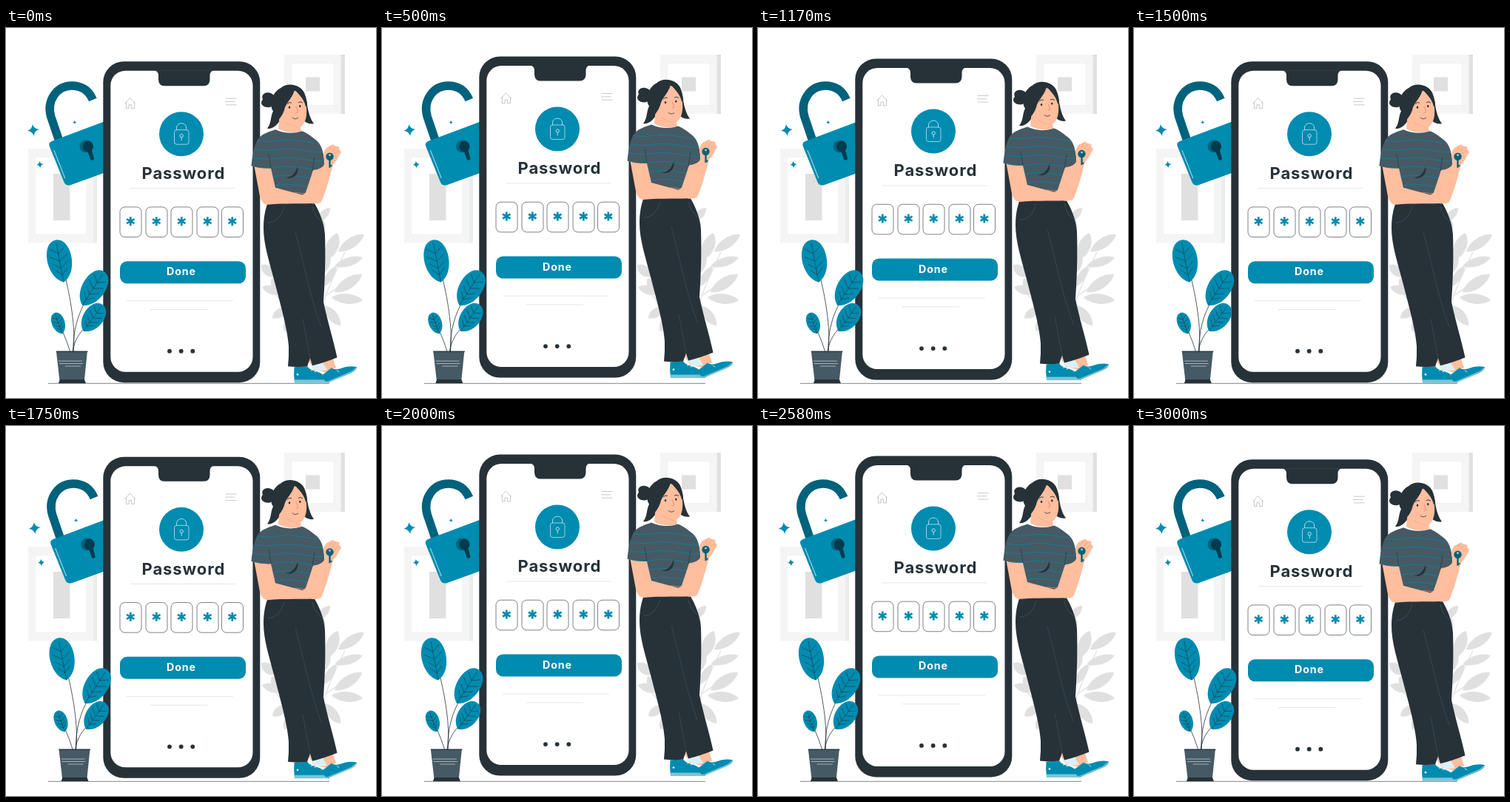
Animation, 500 px wide and 500 px high, one loop 3.04 s. Source, as an HTML page with a canvas:

```html
<!DOCTYPE html>
<html lang="en">
<head>
<meta charset="utf-8">
<title>Password</title>
<style>
html, body { margin: 0; width: 100%; height: 100%; overflow: hidden; background: #fff; }
canvas { display: block; width: 500px; height: 500px; }
</style>
</head>
<body>
<canvas id="stage"></canvas>
<script>
const canvas = document.getElementById('stage');
const ctx = canvas.getContext('2d');
const dpr = window.devicePixelRatio || 1;
canvas.width = canvas.height = 500 * dpr;

const INK = '#263238', SLATE = '#455a64', TEAL = '#008bb0', DEEP = '#00627c';
const SKIN = '#ffbe9d', PALE = '#e0e0e0', WALL = '#f5f5f5';
const LOOP = 3040, FRAMES = 73, STEP = 1000 / 24, LEAD = 30;

const fill = (d, color) => { ctx.fillStyle = color; ctx.fill(new Path2D(d)); };
const line = (d, color, w = 0.5) => {
  ctx.strokeStyle = color;
  ctx.lineWidth = w;
  ctx.stroke(new Path2D(d));
};
const rect = (x, y, w, h, color) => { ctx.fillStyle = color; ctx.fillRect(x, y, w, h); };
const roundPath = (x, y, w, h, r) => { ctx.beginPath(); ctx.roundRect(x, y, w, h, r); };
const round = (x, y, w, h, r, color) => {
  roundPath(x, y, w, h, r);
  ctx.fillStyle = color;
  ctx.fill();
};
const oval = (x, y, rx, ry, color) => {
  ctx.beginPath();
  ctx.ellipse(x, y, rx, ry, 0, 0, Math.PI * 2);
  ctx.fillStyle = color;
  ctx.fill();
};
const text = (s, x, y, size, color, gap) => {
  ctx.font = `700 ${size}px Inter, "Open Sans", sans-serif`;
  ctx.letterSpacing = gap + 'px';
  ctx.textAlign = 'center';
  ctx.fillStyle = color;
  ctx.fillText(s, x, y);
};
const shifted = (x, y, draw) => {
  ctx.save();
  ctx.translate(x, y);
  draw();
  ctx.restore();
};

// Motion
const lift = T => {
  const p = T / 1500 % 1;
  return -10 * (p < 0.5 ? 2 * p : 2 - 2 * p);
};
const SHAKE = [0, -1, 2, -4, 4, -4, 4, -4, 2, -1, 0];
const shake = (T, span) => {
  const p = T / span % 1 * 10, i = Math.floor(p);
  return SHAKE[i] + (SHAKE[i + 1] - SHAKE[i]) * (p - i);
};

// Background
function picture(x, y, w, h, depth, side, art) {
  rect(x, y, w, h, WALL);
  rect(x + w, y, depth, h, side);
  const m = 9.5;
  rect(x + m, y + m + 2, w - 2 * m, h - 2 * m - 4, '#fff');
  line(`M${x} ${y}l${m} ${m + 2}M${x + w} ${y}l${-m} ${m + 2}M${x} ${y + h}l${m} ${-m - 2}M${x + w} ${y + h}l${-m} ${-m - 2}`, '#e9e9e9');
  ctx.strokeStyle = '#ebebeb';
  ctx.strokeRect(x + m, y + m + 2, w - 2 * m, h - 2 * m - 4);
  rect(...art, PALE);
}

function blade(x, y, tx, ty, w) {
  const dx = tx - x, dy = ty - y, n = Math.hypot(dx, dy);
  const px = -dy / n * w, py = dx / n * w;
  const at = (k, s) => `${x + dx * k + s * px} ${y + dy * k + s * py}`;
  fill(`M${x} ${y}C${at(0.25, 1)} ${at(0.75, 1)} ${tx} ${ty}C${at(0.75, -1)} ${at(0.25, -1)} ${x} ${y}Z`, PALE);
}

function backdrop() {
  line('M57 480.3H437', INK, 0.6);
  picture(30, 163, 88, 127.5, 5, '#ededed', [64, 197, 22.5, 63]);
  picture(376, 36, 76.5, 80, 5.5, PALE, [405, 66.5, 19, 19]);
  line('M424 398C428 360 446 330 458 303M431 362C440 357 448 351 453 346M425 300C428 280 428 265 427 255M364 360C374 370 384 384 390 398', PALE, 1.2);
  [[420, 262, 438, 243, 7], [424, 280, 428, 258, 7], [434, 313, 448, 277, 11],
   [449, 302, 484, 279, 9], [444, 322, 482, 310, 8], [428, 332, 436, 304, 8],
   [444, 357, 481, 333, 10], [440, 364, 482, 368, 9], [430, 375, 452, 402, 9],
   [428, 350, 446, 322, 7], [364, 336, 345, 320, 9], [374, 358, 346, 350, 8],
   [369, 358, 359, 338, 7], [380, 378, 360, 392, 8], [386, 390, 376, 410, 7]
  ].forEach(b => blade(...b));
}

// Padlock
function star(x, y, r) {
  ctx.save();
  ctx.translate(x, y);
  ctx.rotate(-0.12);
  const q = r * 0.16;
  fill(`M0 ${-r}Q${q} ${-q} ${r} 0Q${q} ${q} 0 ${r}Q${-q} ${q} ${-r} 0Q${-q} ${-q} 0 ${-r}Z`, TEAL);
  ctx.restore();
}

function padlock() {
  line('M72.5 154L61 120C54.5 98 69 78 89 78C102 78 112 84 117.5 97', DEEP, 11.5);
  fill('M62 153L150 120L168 183L88 212Q81 214 78.5 208L59 160Q57 155 62 153Z', TEAL);
  line('M65 165L80 203', '#d5edf4', 0.9);
  oval(108.5, 160, 8.8, 8.5, DEEP);
  oval(111.2, 160, 7, 7.4, '#003c4d');
  fill('M109.5 164L114.6 178Q117.3 180 119.2 177L115.5 163Z', '#003c4d');
  star(37, 138, 8);
  star(93, 127.5, 2.6);
  star(46, 184.5, 4.7);
}

// Phone
function asterisk(x, y) {
  line(`M${x} ${y - 6}V${y + 6}M${x - 5.2} ${y - 3}L${x + 5.2} ${y + 3}M${x - 5.2} ${y + 3}L${x + 5.2} ${y - 3}`, TEAL, 2.7);
}

function phone() {
  round(131.3, 45, 212, 434, 28, INK);
  round(141.3, 57.5, 192.2, 407, 20, '#fff');
  fill('M200 57H281Q275.5 58 275.5 64V69Q275.5 78 267 78H214Q206 78 206 69V64Q206 58 200 57Z', INK);

  line('M160.5 102L167.5 94.3L174.7 102M162.5 100V108.5H166V103.5H169.5V108.5H173.5V100', '#8c9296');
  line('M297 95H311.5M296 99.3H309.5M297 103.6H311.5', '#8c9296');

  oval(237, 143, 30, 30, TEAL);
  ctx.strokeStyle = '#fff';
  ctx.lineWidth = 0.6;
  roundPath(227.5, 137.5, 19.5, 19.5, 3);
  ctx.stroke();
  line('M230.5 137.5V135C230.5 126.5 243.7 126.5 243.7 135V137.5M237.2 147.7V152', '#fff', 0.7);
  ctx.beginPath();
  ctx.arc(237.2, 145.5, 2.2, 0, 7);
  ctx.stroke();

  text('Password', 239.9, 203.7, 22, INK, 0.9);
  line('M168 216.5H309.5', PALE, 0.8);

  [154, 189, 223, 258, 291.5].forEach(x => {
    roundPath(x, 241.7, 29, 40.6, 6.5);
    ctx.strokeStyle = INK;
    ctx.lineWidth = 0.6;
    ctx.stroke();
    asterisk(x + 14.3, 261);
  });

  round(154, 315, 170, 30, 9.5, TEAL);
  text('Done', 236.9, 334, 14.2, '#fff', 0.9);
  line('M163 368.5H307M195 380.3H272', PALE, 0.8);
  [221, 236.7, 252.3].forEach(x => oval(x, 436.5, 2.9, 2.9, INK));
}

// Woman
const SHIRT = 'M364 137C355 140 346 143 341 149C335 158 333 172 331.5 186Q344 190 358 189.5L364 215.5L405 226.5L415 193Q424 192 430.5 186C430 173 428 160 421 153C415 148 408 142 400 139Q382 145 364 137Z';

function shoes() {
  fill('M390 452L406 452L410 464L391 464Z', SKIN);
  fill('M408 448L440 440L446 459L432 465L416 462Z', SKIN);
  fill('M411 455L427 450L434 462L420 464Z', '#dceff4');
  fill('M389.5 458L407 457C412 464 420 462 428 468L438 475Q439 479 434 479H390Q388.5 468 389.5 458Z', TEAL);
  fill('M389.5 475H437V479.3H390Z', '#7cc4d8');
  fill('M427 469L440 459C444 463 452 460 458 458Q468 456 474 458Q474 462 466 466L435 479Q430 478 427 469Z', TEAL);
  line('M431 478.5L436 477.5L467 464.5L473.5 459', '#7cc4d8', 1.5);
  line('M412 463L416 460M417 465L421 462M447 462L450 465', '#fff', 0.9);
  oval(394, 468, 1.4, 1.4, '#dceff4');
}

function trousers() {
  fill('M354 235C350 246 348 256 348 270C348 292 356 316 363 343C372 377 381 410 382 430Q382.5 444 381 457Q394 458.5 407 457L411 446L414 456Q430 452 447.5 445C442 420 434 394 429 370C431 342 432 310 431 279C430 262 423 247 416 235Z', INK);
  line('M391 276C402 315 410 360 426 404M411 446L401 393', SLATE, 0.5);
  line('M354 263Q370 262 376 241M414 241Q416 254 427 262', '#53656d', 0.5);
}

function torso() {
  fill('M335 184L358 188L365 215L405 225L427 229L425 236C403 238 376 236 353 238.5Q346 238 343 227Z', SKIN);
  ctx.save();
  fill(SHIRT, SLATE);
  ctx.clip(new Path2D(SHIRT));
  for (let i = 0; i < 6; i++) {
    const y = 150 + i * 12;
    line(`M328 ${y}Q352 ${y + 5} 366 ${y + 2}T408 ${y + 4}T436 ${y - 1}`, TEAL, 0.65);
  }
  ctx.restore();
  line('M358 189L355 170M414 193L417 174', INK, 0.6);
  fill('M378 202C387 201 391 196 394 187C396 195 391 205 378 202Z', INK);
  fill('M415 192Q424 191 429 186L433 176L443 181C438 197 436 210 427 233Q424 238 413 237L400 226L405 222Z', SKIN);
  line('M405 224L390 222', '#e99778', 0.6);
  fill('M431 181C428 171 429 165 434 161L440 158Q443 156 444 159L449 160Q452 161 450 164Q455 167 451 171L446 180Q441 187 434 185Z', SKIN);
  line('M440 159L437 165M445 161L441 167M450 165L444 170', '#e99778', 0.6);
  oval(437.5, 173.5, 5.2, 5.2, DEEP);
  oval(437.5, 171.5, 1.4, 1.4, SKIN);
  line('M437.5 177V188.5M437.5 186H440.5', DEEP, 2.3);
}

function head() {
  fill('M360 89C351 84 344 90 347 96C342 102 347 107 355 107C363 106 366 94 360 89Z', INK);
  fill('M371 81C379 73 397 75 403 87C408 98 406 115 416 129Q406 131 399 121L373 121C367 130 361 137 353 135.5C359 128 357 120 361 112C354 101 361 86 371 81Z', INK);
  fill('M370 113L368 136Q384 144 399 139L397 128L382 118Z', SKIN);
  line('M379 128Q386 133 395 134', '#e99778', 0.6);
  fill('M388 84C399 86 405 96 406 108C407 120 404 131 397 133.5C388 135 377 127 372 118C369 108 375 96 388 84Z', SKIN);
  fill('M391 80C388 93 381 98 377 107Q375 116 369 123L361 112C361 94 371 81 391 80Z', INK);
  fill('M389 81C394 89 402 93 405 106L407 104C407 91 399 81 389 80Z', INK);
  oval(383, 107, 1.2, 1.6, INK);
  oval(397.3, 105.5, 1.2, 1.6, INK);
  line('M380 102.5Q383 99 386 101M395 100.5Q398 98.5 401 101', INK, 0.9);
  line('M392 106L395 113Q393.5 115 391.5 114', '#d87c60', 0.7);
  line('M387 120.5Q390 124.5 395 121', INK, 0.8);
}

function woman() {
  shoes();
  trousers();
  torso();
  head();
}

// Potted plant
function leaf(x, y, rx, ry, deg) {
  ctx.save();
  ctx.translate(x, y);
  ctx.rotate(deg * Math.PI / 180);
  fill(`M0 ${-ry}C${rx * 1.25} ${-ry} ${rx * 1.35} ${ry * 0.65} 0 ${ry}C${-rx * 1.35} ${ry * 0.65} ${-rx * 1.25} ${-ry} 0 ${-ry}Z`, TEAL);
  let veins = `M0 ${-ry * 0.85}V${ry}`;
  for (const v of [-0.35, 0, 0.35, 0.65]) {
    const w = rx * (0.72 - Math.abs(v) * 0.35);
    veins += `M${-w} ${(v - 0.28) * ry}L0 ${v * ry}L${w} ${(v - 0.28) * ry}`;
  }
  line(veins, INK, 0.5);
  ctx.restore();
}

function plant() {
  line('M91 438C95 405 86 360 80 336M91 438C90 410 98 385 108 369M90 438C92 422 101 410 107 405M87 438Q82 422 77 411', INK, 0.8);
  leaf(72.7, 315, 17, 29, -11);
  leaf(118, 352, 16, 27, 33);
  leaf(117.7, 391.7, 14, 22, 36);
  leaf(71, 399, 9, 15, -20);
  fill('M68 437H110L106 476H72.5Z', SLATE);
  rect(68, 436.5, 42.5, 1.3, INK);
  line('M71 450H103M72 453.5H104M80 457H101', '#cfd8dc', 0.7);
  fill('M73 475H106L108 480H71Z', INK);
}

function frame(now) {
  const t = now % LOOP;
  const T = Math.min(FRAMES - 1, Math.floor(t * FRAMES / LOOP + 0.1)) * STEP + LEAD;
  ctx.setTransform(dpr, 0, 0, dpr, 0, 0);
  rect(0, 0, 500, 500, '#fff');
  backdrop();
  shifted(shake(T, 1500), 0, padlock);
  const y = lift(T) + 0.6;
  shifted(0, y, phone);
  shifted(0, y, woman);
  shifted(shake(T, 3000), 0, plant);
}

let start;
function tick(now) {
  start ??= now;
  frame(now - start);
  requestAnimationFrame(tick);
}
frame(0);
requestAnimationFrame(tick);
</script>
</body>
</html>
```
